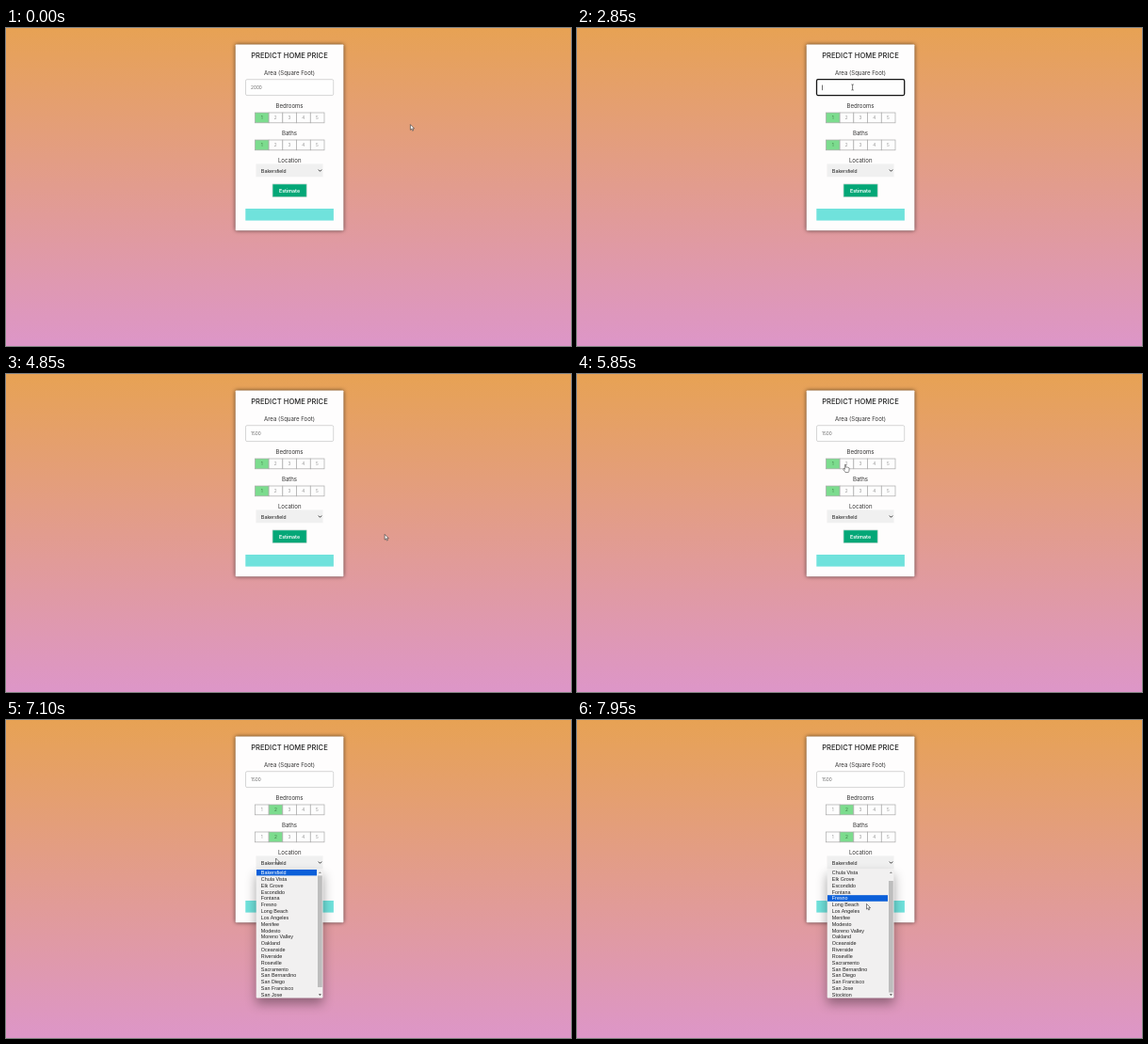
Animation of 600 by 338 pixels, one loop 8 s. Source, as an HTML page:

```html
<!DOCTYPE html>
<html lang="en">
<head>
<meta charset="utf-8">
<title>Predict home price</title>
<style>
  html, body { margin: 0; width: 100%; height: 100%; overflow: hidden; }
  svg { display: block; width: 100vw; height: 100vh; }
  text { font-family: Inter, sans-serif; fill: #333; }
  .title { font-size: 7.6px; font-weight: 500; fill: #222; }
  .label { font-size: 6.05px; }
  .mid { text-anchor: middle; }
  .digit { font-size: 4.7px; font-weight: 300; fill: #777; }
  .digit.on { fill: #3c7a45; font-weight: 400; }
  .value { font-size: 4.8px; font-weight: 300; fill: #444; }
  .list text, .choice { font-family: "Liberation Sans", Arial, sans-serif; font-size: 5.4px; fill: #222; }
  .list text.hot { fill: #fff; }
  .card { filter: drop-shadow(0 0.5px 2px rgba(0, 0, 0, .65)); }
  .list { filter: drop-shadow(0 6px 6px rgba(0, 0, 0, .36)); }
  .submit { filter: drop-shadow(0 .3px .6px rgba(0, 0, 0, .3)); }
</style>
</head>
<body>
<svg viewBox="0 0 600 338" preserveAspectRatio="none">
  <defs>
    <linearGradient id="sky" x1="0" y1="0" x2="0" y2="1">
      <stop offset="0" stop-color="#e7a254"/>
      <stop offset="1" stop-color="#dd96c8"/>
    </linearGradient>
    <clipPath id="rows"><rect x="266" y="158.7" width="64.2" height="136.6"/></clipPath>
  </defs>
  <rect width="600" height="338" fill="url(#sky)"/>
  <rect class="card" x="243.7" y="17.4" width="114.7" height="197.8" rx=".8" fill="#fefdfd"/>

  <text class="title mid" x="301" y="31.8">PREDICT HOME PRICE</text>
  <text class="label mid" x="301" y="49.9">Area (Square Foot)</text>
  <rect id="field" x="254.5" y="54.7" width="93.2" height="16.9" rx="1.5" fill="#fefefe"/>
  <text id="value" class="value" x="260" y="65.2"></text>
  <path id="caret" d="M0 60.6v5.6" stroke="#111" stroke-width=".6"/>

  <text class="label mid" x="301" y="84.9">Bedrooms</text>
  <g id="beds"></g>
  <text class="label mid" x="301" y="114">Baths</text>
  <g id="baths"></g>

  <text class="label mid" x="301.2" y="143.1">Location</text>
  <rect x="265.5" y="144.5" width="71" height="13.8" fill="#f0f0f0"/>
  <text class="choice" x="270.8" y="153.5">Bakersfield</text>
  <path d="M331.8 150.6l1.7 1.7 1.7-1.7" fill="none" stroke="#222" stroke-width=".9"/>

  <rect class="submit" x="283.1" y="166" width="36" height="13.4" fill="#04a777" stroke="#b9e4d5" stroke-width=".5"/>
  <text class="mid" x="301" y="174.6" style="font-size:5.3px;font-weight:600;fill:#fff">Estimate</text>
  <rect x="254.3" y="192" width="93.6" height="12.6" fill="#70e2dc"/>

  <g id="list" class="list">
    <rect x="265.7" y="158.5" width="70.8" height="137" rx="1" fill="#f1f0f0"/>
    <g clip-path="url(#rows)"><g id="items">
      <rect id="bar" x="266" width="64" height="6.6" fill="#0b5fd9"/>
    </g></g>
    <rect id="thumb" x="331" width="4.8" height="118.6" fill="#bdbdbd"/>
    <path d="M331.9 163l1.5-1.8 1.5 1.8z" fill="#8a8a8a"/>
    <path d="M331.9 291.2l1.5 1.8 1.5-1.8z" fill="#444"/>
  </g>

  <g id="pointer" stroke-linejoin="round">
    <path id="arrow" d="M0 0v5.7l1.3-1.2 .9 2.1 1-.4-.9-2h1.8z" fill="#fff" stroke="#333" stroke-width=".6"/>
    <path id="beam" d="M-1.2-3h.8q.4 0 .4.5v5q0 .5-.4.5h-.8M1.2-3h-.8q-.4 0-.4.5M1.2 3h-.8q-.4 0-.4-.5" fill="none" stroke="#222" stroke-width=".6"/>
    <path id="hand" d="M-.6.4q.6-.8 1.2 0v2.8q.6-.5 1.2.1.7-.4 1.2.2.9-.2 1 .6v2q0 1.4-.8 2.5h-3.2q-.7-1.2-2.2-3.2-.1-1 .8-.7l.8.7z" fill="#fff" stroke="#333" stroke-width=".55"/>
  </g>
</svg>
<script>
const $ = id => document.getElementById(id);
const LOOP = 8000, STEP = 50, ROW = 6.84, LIST_TOP = 158.8;
const cities = ["Bakersfield", "Chula Vista", "Elk Grove", "Escondido", "Fontana", "Fresno",
  "Long Beach", "Los Angeles", "Menifee", "Modesto", "Moreno Valley", "Oakland", "Oceanside",
  "Riverside", "Roseville", "Sacramento", "San Bernardino", "San Diego", "San Francisco",
  "San Jose", "Stockton"];

// time, x, y of the pointer's hot spot
const path = [[0, 429.4, 102.6], [350, 352, 76], [650, 295, 63], [750, 292.6, 63],
  [4100, 292.6, 63], [4500, 426, 128], [4700, 422, 150], [4950, 390, 183],
  [5250, 345, 152], [5600, 290, 101], [5750, 285, 96],
  [6000, 285, 96], [6400, 286, 124], [6600, 286, 124], [6950, 286.6, 147],
  [7150, 286.6, 147], [7400, 294, 165], [7700, 307.5, 195.4], [LOOP, 307.5, 195.4]];
const typing = [[0, "2000"], [1150, "200"], [1450, "20"], [1700, "2"], [2200, ""],
  [3200, "1"], [3400, "15"], [3500, "150"], [3650, "1500"]];
const when = { focus: 750, blur: 4600, beds: 6050, baths: 6550, open: 7050, scroll: 7800 };

function add(parent, tag, attrs, content = "") {
  const node = document.createElementNS("http://www.w3.org/2000/svg", tag);
  for (const key in attrs) node.setAttribute(key, attrs[key]);
  node.textContent = content;
  return parent.appendChild(node);
}

function makeSwitch(group, y) {
  const cells = [1, 2, 3, 4, 5].map((n, i) => {
    const x = 264.4 + i * 14.72;
    return {
      box: add(group, "rect", { x, y, width: 14.72, height: 10.8, stroke: "#aaa", "stroke-width": .7 }),
      digit: add(group, "text", { class: "digit mid", x: x + 7.2, y: y + 7.2 }, n)
    };
  });
  return chosen => cells.forEach(({ box, digit }, i) => {
    box.setAttribute("fill", i === chosen ? "#7cdc8e" : "#fdfdfd");
    digit.classList.toggle("on", i === chosen);
  });
}

const pickBeds = makeSwitch($("beds"), 90);
const pickBaths = makeSwitch($("baths"), 119);
const rows = cities.map((city, i) =>
  add($("items"), "text", { x: 270.8, y: LIST_TOP + i * ROW + 5.25 }, city));

const show = (id, on) => $(id).style.display = on ? "" : "none";
const lastBefore = (table, t) => table.filter(row => row[0] <= t).pop();

function pointerAt(t) {
  const a = lastBefore(path, t), b = path[path.indexOf(a) + 1];
  const k = (t - a[0]) / (b[0] - a[0]), s = k * k * (3 - 2 * k) * .4 + k * .6;
  return [a[1] + (b[1] - a[1]) * s, a[2] + (b[2] - a[2]) * s];
}

function pointerShape(x, y) {
  const inside = (l, t, r, b) => x > l && x < r && y > t && y < b;
  if (inside(254, 54, 348, 72)) return "beam";
  const clickable = inside(264, 89, 338, 101) || inside(264, 118, 338, 130) || inside(283, 166, 319, 179);
  return clickable ? "hand" : "arrow";
}

function draw(t) {
  const focused = t >= when.focus && t < when.blur, open = t >= when.open;

  $("field").setAttribute("stroke", focused ? "#151515" : "#c4c4c4");
  $("field").setAttribute("stroke-width", focused ? 1.3 : .7);
  $("value").textContent = lastBefore(typing, t)[1];
  show("caret", focused);
  $("caret").setAttribute("transform", `translate(${260.5 + $("value").getComputedTextLength()} 0)`);

  pickBeds(t < when.beds ? 0 : 1);
  pickBaths(t < when.baths ? 0 : 1);

  const [x, y] = pointerAt(t);
  const shape = open ? "arrow" : pointerShape(x, y);
  ["arrow", "beam", "hand"].forEach(id => show(id, id === shape));
  $("pointer").setAttribute("transform", `translate(${x} ${y})`);

  show("list", open);
  const scroll = Math.min(1, Math.max(0, (t - when.scroll) / 100));
  const hot = Math.max(0, Math.floor((y - LIST_TOP) / ROW));
  $("items").setAttribute("transform", `translate(0 ${-scroll * ROW})`);
  $("bar").setAttribute("y", LIST_TOP + hot * ROW);
  $("thumb").setAttribute("y", 165.4 + scroll * 5.6);
  rows.forEach((row, i) => row.classList.toggle("hot", i === hot));
}

const start = performance.now();
function tick() {
  const t = Math.max(0, performance.now() - start) % LOOP;
  draw(Math.floor(t / STEP) * STEP);
  requestAnimationFrame(tick);
}
tick();
</script>
</body>
</html>
```
